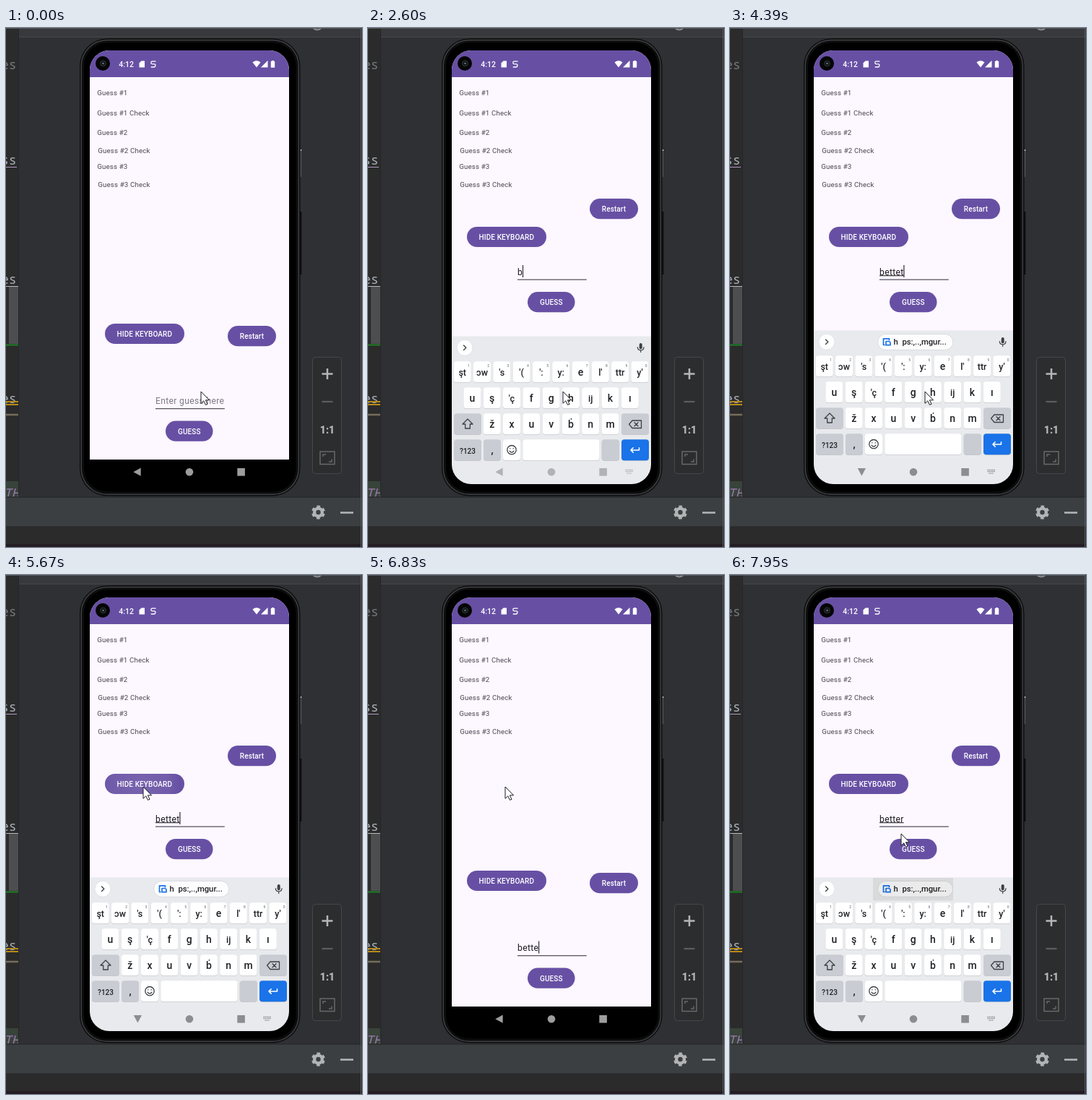
Recreate the animation shown at these times as an HTML page. Size 493 px wide and 718 px high, loop 8000 ms.

```html
<!DOCTYPE html>
<html lang="en">
<head>
<meta charset="utf-8">
<title>Guess app</title>
<style>
html, body { margin: 0; width: 493px; height: 718px; overflow: hidden; background: #2b2b2b; }
svg { display: block; }
text { font-family: Roboto, sans-serif; white-space: pre; }
.code { font: 18px "Noto Sans Mono", monospace; fill: #a9b0b8; }
.label { font-size: 9.7px; letter-spacing: .16px; fill: #49454f; }
.btn rect { fill: #6750a4; }
.btn text { font-size: 10px; font-weight: 500; letter-spacing: .1px; fill: #fff; text-anchor: middle; }
.field { font-size: 12.08px; letter-spacing: .35px; fill: #1d1b20; }
.key { font-size: 14px; font-weight: 500; fill: #202124; text-anchor: middle; }
.line { fill: none; stroke-linecap: round; stroke-linejoin: round; }
</style>
</head>
<body>
<svg id="stage" width="493" height="718" viewBox="0 0 493 718">
  <defs>
    <clipPath id="screen"><rect x="116" y="31" width="276" height="600" rx="27"/></clipPath>
    <clipPath id="pill"><rect x="137" y="275" width="110" height="28" rx="14"/></clipPath>
    <clipPath id="editor"><rect width="17" height="649"/></clipPath>
    <radialGradient id="glow">
      <stop offset="0" stop-color="#fff" stop-opacity=".11"/>
      <stop offset=".7" stop-color="#fff" stop-opacity=".07"/>
      <stop offset="1" stop-color="#fff" stop-opacity="0"/>
    </radialGradient>
  </defs>

  <!-- IDE -->
  <rect width="493" height="718" fill="#2f3033"/>
  <rect x="18" width="475" height="12" fill="#37393c"/>
  <path d="M18 12.5H493" stroke="#46484a"/>
  <path class="line" d="M425 0Q431 5 437 0" stroke="#8c8e90" stroke-width="2"/>
  <g clip-path="url(#editor)">
    <rect width="17" height="650" fill="#2b2b2b"/>
    <rect y="627" width="17" height="23" fill="#38433a"/>
    <text class="code" x="-7" y="56.5" style="fill:#74787c">es</text>
    <text class="code" x="-7" y="189">ss</text>
    <text class="code" x="-7" y="354">es</text>
    <text class="code" x="-7" y="518.5">es</text>
    <path d="M0 517H17M0 521H17" stroke="#b88a18" stroke-width="1.9"/>
    <text class="code" x="-3" y="650" style="fill:#9876aa;font-style:italic">TH</text>
    <rect x="4" y="358" width="13" height="79" fill="#4d4e50"/>
    <path d="M0 438.5H17" stroke="#1f7d25" stroke-width="2"/>
    <path d="M0 535H17" stroke="#766d5a" stroke-width="2.5"/>
    <g id="marks">
      <path d="M0 192.5H15" stroke="#b09abf"/>
      <path d="M0 357.5H17" stroke="#b9b9b9"/>
    </g>
  </g>
  <path d="M17.5 0V649" stroke="#252628"/>
  <rect y="649" width="493" height="41" fill="#3c3f41"/>
  <path d="M0 649H493M0 690H493" stroke="#292a2b" stroke-width="1.5"/>
  <rect y="691" width="493" height="23" fill="#2b2b2b"/>
  <rect y="714" width="493" height="4" fill="#241d24"/>
  <path d="M0 .5H491.5V718" fill="none" stroke="#56585b"/>
  <g fill="none" stroke="#b2b4b6">
    <circle cx="432.5" cy="670" r="5.4" stroke-width="4.4"/>
    <circle cx="432.5" cy="670" r="8.2" stroke-width="2.6" stroke-dasharray="4.6 3.987" transform="rotate(14 432.5 670)"/>
    <path d="M463 670.5H481" stroke-width="2.6"/>
  </g>
  <rect x="424.5" y="455.5" width="40" height="161" rx="4" fill="#2c2d2f" stroke="#46484b"/>
  <path d="M437.5 478.5H452.5M445 471V486" stroke="#b4b6b8" stroke-width="2.5"/>
  <path d="M437.5 517H452.5" stroke="#5b5d5f" stroke-width="2.2"/>
  <text x="445" y="561" text-anchor="middle" font-size="14" font-weight="800" fill="#b4b6b8">1:1</text>
  <g fill="none" stroke="#66686a" stroke-width="1.5">
    <rect x="435" y="586" width="20" height="17.5"/>
    <path d="M439 593V590H443M447 600H451V596.5"/>
  </g>

  <!-- phone -->
  <path d="M408.3 169V206" stroke="#55575a" stroke-width="1.6"/>
  <path d="M408.3 254V341" stroke="#0b0b0b" stroke-width="2"/>
  <path d="M408.5 168V170" stroke="#d0d0d0" stroke-width="1.4"/>
  <rect x="102" y="14.5" width="305.5" height="633" rx="38" fill="#0d0d0e"/>
  <rect x="104.2" y="16.7" width="301.1" height="628.6" rx="36" fill="none" stroke="#3f4043" stroke-width="1.5"/>
  <rect x="108" y="20.5" width="293.5" height="621" rx="32" fill="#000"/>

  <g clip-path="url(#screen)">
    <rect x="116" y="31" width="276" height="600" fill="#000"/>
    <rect x="116" y="31" width="276" height="566" fill="#fdf7ff"/>
    <rect x="116" y="31" width="276" height="37" fill="#6750a4"/>
    <circle cx="134" cy="49" r="10" fill="#050505"/>
    <circle cx="134.5" cy="49" r="4" fill="#15191c" stroke="#2b3135"/>
    <circle cx="134.5" cy="49" r="1.1" fill="#7e8c92"/>
    <text x="156.3" y="54" font-size="10.5" font-weight="500" fill="#fff">4:12</text>
    <g fill="#fff">
      <path d="M187.5 45.5H192V54.5H184.5V48.5Z"/>
      <path d="M341.5 47.5Q347 43.2 352.5 47.5L347 54.5Z"/>
      <path d="M362.5 45V54.5H353Z"/>
      <path d="M368 45H371V46H372.2V54.8H366.8V46H368Z"/>
    </g>
    <path class="line" d="M207 46.2H202.5Q200.8 46.2 200.8 48T202.5 49.8H205.3Q207 49.8 207 51.8T205 54H201.2" stroke="#fff" stroke-width="1.3"/>
    <g id="labels"></g>

    <g id="hide" class="btn">
      <rect x="137" y="275" width="110" height="28" rx="14"/>
      <circle id="ripple" cx="186" cy="291" fill="url(#glow)" clip-path="url(#pill)"/>
      <text x="191.8" y="292.7">HIDE KEYBOARD</text>
    </g>
    <g id="restart" class="btn">
      <rect x="307" y="236" width="67" height="28.3" rx="14.1"/>
      <text x="340.5" y="253.9">Restart</text>
    </g>
    <g id="form">
      <text id="hint" class="field" x="207" y="341.5">Enter guess here</text>
      <text id="typed" class="field" x="207" y="341.5"></text>
      <rect id="compose" x="207" y="342.2" height="1" fill="#1d1b20"/>
      <rect id="caret" y="328" width="1.3" height="17" fill="#3d3646"/>
      <path d="M207 348.2H302.8" stroke="#56505d" stroke-width="1.2"/>
      <g class="btn">
        <rect x="221" y="365" width="65.5" height="28.3" rx="14.1"/>
        <text x="253.8" y="383">GUESS</text>
      </g>
    </g>

    <g id="keyboard">
      <rect x="116" y="418.5" width="276" height="222" fill="#e8eaed"/>
      <circle cx="134" cy="434.3" r="11" fill="#fff" stroke="#d8dadd" stroke-width=".7"/>
      <path class="line" d="M132.5 431L135.8 434.3L132.5 437.6" stroke="#3c4043" stroke-width="1.4"/>
      <rect x="375.7" y="428" width="4" height="8.3" rx="2" fill="#3c4043"/>
      <path class="line" d="M373.3 433.5Q373.5 437.8 377.7 437.8T382 433.5M377.7 438V440.5" stroke="#3c4043" stroke-width="1.2"/>
      <g id="chip">
        <rect x="204.7" y="423.5" width="104" height="21.8" rx="10.9" fill="#fdfdfe" stroke="#d3d6da" stroke-width=".8"/>
        <path class="line" d="M214 438.5H212.5V429.8H220.5V431.5M215 429.8H218M216 433.5V438.7H222V435L220.5 433.5Z" stroke="#1a73e8" stroke-width="1.7"/>
        <text x="226.5" y="438.3" font-size="11.3" font-weight="500" fill="#202124">h  ps:,..,mgur...</text>
        <rect id="chipPress" x="198" y="419" width="111" height="31.5" fill="#000" fill-opacity=".07"/>
      </g>
      <g id="keys"></g>
      <g class="line" stroke="#3c4043" stroke-width="1.3">
        <path d="M138 533L145 540H141.3V546H134.7V540H131Z"/>
        <path d="M366 535H378.5V545.5H366L361.5 540.2ZM369 537.7L374 542.8M374 537.7L369 542.8"/>
        <circle cx="199" cy="575.7" r="6.2"/>
        <path d="M196 577.2Q199 581.2 202 577.2M196.8 573.7V573.9M201.2 573.7V573.9"/>
        <path d="M375.5 572.7V575.9H364M367.2 572.7L364 575.9L367.2 579.1" stroke="#fff" stroke-width="1.5"/>
      </g>
    </g>
    <g id="nav">
      <path id="back" d="M176.3 614.2L186.7 608.6V619.8Z"/>
      <circle cx="254" cy="614.2" r="5.3"/>
      <rect x="320.3" y="609" width="10.6" height="10.6"/>
      <path id="ime" d="M356.5 611.5H367M356.5 613.7H367M358.5 616.2H365" fill="none" stroke-width="1.3" stroke-dasharray="1.5 .7"/>
    </g>
  </g>
  <path id="mouse" d="M0 0V16.3L3.8 12.8L6.5 18.4L9 17.3L6.4 11.8H11.6Z" fill="#fff" stroke="#1c1c20"/>
</svg>
<script>
const $ = id => document.getElementById(id);
const LOOP = 8000, OFF = 230;

$('labels').innerHTML = [90, 117.5, 145, 170, 192, 217].map((y, i) => {
  const check = i % 2 ? ' Check' : '';
  return `<text class="label" x="${i === 3 || i === 5 ? 127.3 : 126.3}" y="${y + 3.4}">Guess #${(i >> 1) + 1}${check}</text>`;
}).join('');

function key(x, y, w, fill, label = '', size = 14) {
  return `<rect x="${x}" y="${y + .6}" width="${w}" height="29" rx="4" fill="#c2c5c9"/>` +
    `<rect x="${x}" y="${y}" width="${w}" height="29" rx="4" fill="${fill}"/>` +
    `<text class="key" x="${x + w / 2}" y="${y + 19.6}" style="font-size:${size}px">${label}</text>`;
}
function row(x, y, labels) {
  return labels.map((s, i) => key(x + 27.3 * i, y, 24, '#fff', s, s.length > 1 ? 12.5 : 14)).join('');
}
const GREY = '#c9ccd2';
$('keys').innerHTML =
  row(118.7, 453.3, ['şt', 'ɔw', '′s', '′(', '′:', 'y:', 'e', 'l′', 'ttr', 'y′']) +
  row(132.4, 489.3, ['u', 'ş', '′ç', 'f', 'g', 'h', 'ij', 'k', 'ı']) +
  row(159.7, 525.3, ['ž', 'x', 'u', 'v', 'ḃ', 'n', 'm']) +
  [...'1234567890'].map((n, i) =>
    `<text x="${138 + 27.3 * i}" y="461" font-size="5" fill="#5f6368">${n}</text>`).join('') +
  key(119, 525.3, 38, GREY) + key(351, 525.3, 38, GREY) +
  key(119, 561.3, 38, GREY, '?123', 10) + key(160, 561.3, 24, GREY, ',') +
  key(187, 561.3, 24, '#fff') + key(214.3, 561.3, 106.2, '#fff') +
  key(323.7, 561.3, 24.3, GREY) + key(351, 561.3, 38, '#1a73e8');

// Each step changes some properties and holds until the next.
const steps = [
  [0, { up: 0, kb: OFF, text: '', under: 0, caret: 0, press: 0, marks: 1, ime: 0,
        chip: 0, chipPress: 0, turn: 0, ripple: 0, mouse: [270, 503] }],
  [250, { press: 1 }],
  [370, { press: 0, caret: 1 }],
  [620, { ime: 1 }],
  [990, { marks: 0 }],
  [1150, { marks: 1, caret: 0 }],
  [2600, { up: 1, kb: 8, text: 'b', caret: 1 }],
  [2720, { kb: 3 }],
  [2840, { kb: 1 }],
  [2960, { kb: 0 }],
  [3360, { text: 'be', under: 2, chip: .5, turn: -45 }],
  [3480, { chip: 1, turn: -90 }],
  [3730, { text: 'bett', under: 3 }],
  [3990, { under: 4 }],
  [4390, { text: 'bettet', under: 6 }],
  [4640, { mouse: [262, 465] }],
  [4760, { mouse: [226, 372] }],
  [4880, { mouse: [183, 291] }],
  [5000, { mouse: [174, 278], caret: 0 }],
  [5120, { mouse: [190, 293] }],
  [5550, { ripple: 30, caret: 1 }],
  [5670, { ripple: 56 }],
  [5910, { up: 0, kb: 60, under: 0, ripple: 0, turn: -45 }],
  [6030, { kb: 150, turn: 0, chip: 0 }],
  [6150, { kb: OFF, ime: 0 }],
  [6300, { caret: 0 }],
  [6830, { text: 'bette', caret: 1 }],
  [7230, { up: 1, kb: 120, text: 'better', under: 6, ime: 1 }],
  [7350, { kb: 45 }],
  [7470, { kb: 14 }],
  [7590, { kb: 4 }],
  [7710, { kb: 0, mouse: [203, 311] }],
  [7830, { chip: .5, chipPress: 1, turn: -45, mouse: [224, 339] }],
  [7950, { chip: 1, turn: -90, caret: 0, mouse: [237, 358] }],
];

const set = (id, name, value) => $(id).setAttribute(name, value);
const shift = (id, x, y) => set(id, 'transform', `translate(${x} ${y})`);

function draw(s) {
  shift('hide', 0, s.up ? 0 : 134);
  shift('restart', 0, s.up ? 0 : 176);
  shift('form', 0, s.up ? 0 : 178.5);
  shift('keyboard', 0, s.kb);
  shift('mouse', ...s.mouse);

  const typed = $('typed');
  typed.textContent = s.text;
  set('hint', 'style', `fill:${s.press ? '#4f4b55' : '#7d7983'}`);
  set('hint', 'visibility', s.text ? 'hidden' : 'inherit');
  set('compose', 'width', s.under ? typed.getSubStringLength(0, s.under) : 0);
  set('caret', 'x', 207 + (s.text ? typed.getComputedTextLength() - .3 : .4));
  set('caret', 'opacity', s.caret);
  set('ripple', 'r', s.ripple);
  set('marks', 'opacity', s.marks);

  const shown = s.kb < OFF;
  const color = shown ? '#8b8d90' : '#9d9d9d';
  set('nav', 'fill', color);
  set('nav', 'opacity', shown ? Math.max(.4, 1 - .05 * s.kb) : 1);
  set('ime', 'stroke', color);
  set('ime', 'opacity', s.ime);
  set('back', 'transform', `rotate(${s.turn} 182 613.8)`);
  set('chip', 'opacity', s.chip);
  set('chipPress', 'opacity', s.chipPress);
}

let shownStep = -1;
function frame() {
  const t = performance.now() % LOOP;
  const n = steps.filter(([at]) => at <= t).length;
  if (n !== shownStep) {
    shownStep = n;
    draw(Object.assign({}, ...steps.slice(0, n).map(([, change]) => change)));
  }
  requestAnimationFrame(frame);
}
frame();
</script>
</body>
</html>
```
